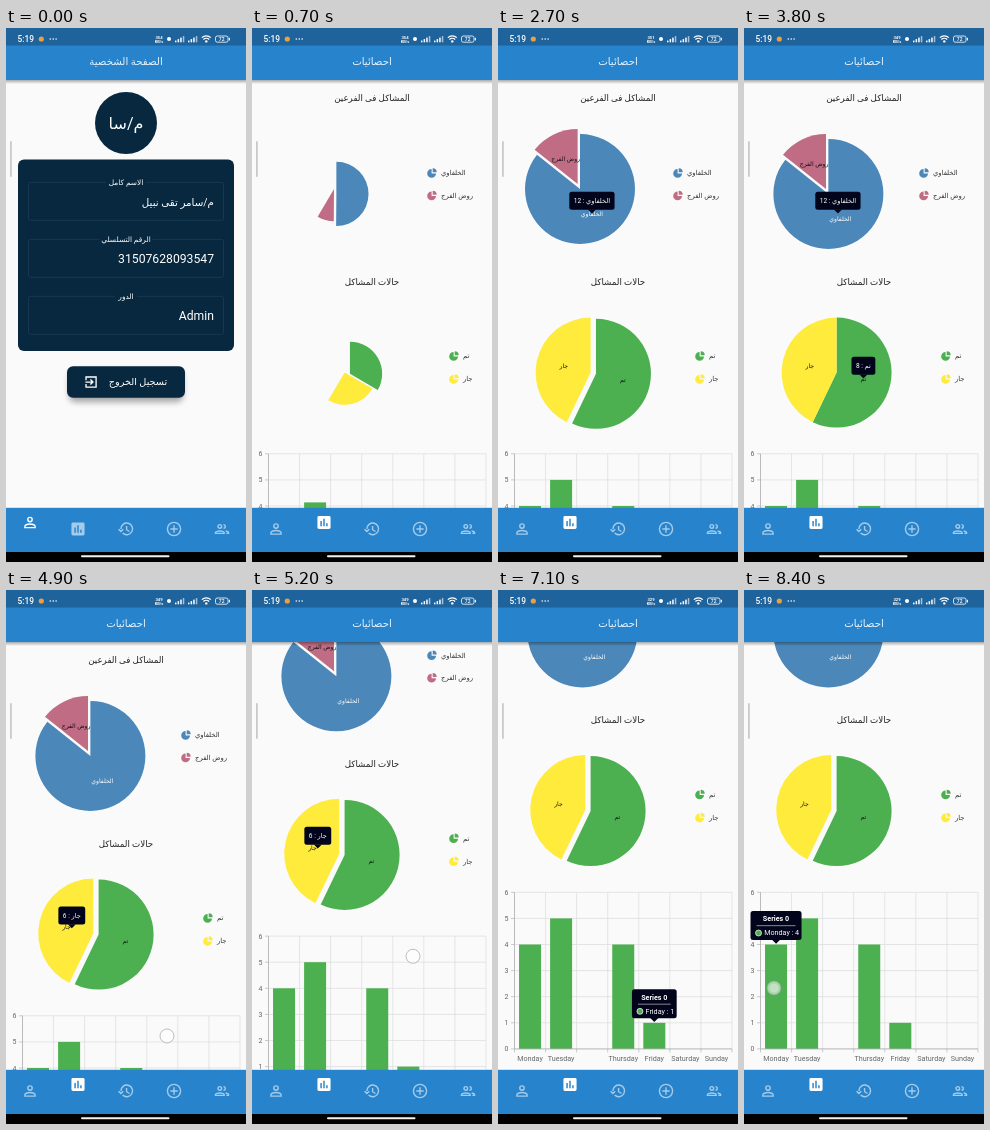
Recreate the animation shown at these times as an HTML page. Size 240 by 534 pixels, loop 8500 ms.

```html
<!DOCTYPE html>
<html lang="ar">
<head>
<meta charset="utf-8">
<style>
html, body { margin: 0; width: 100%; height: 100%; overflow: hidden; background: #fafafa; }
svg { display: block; width: 100vw; height: 100vh; }
text { font-family: Roboto, "DejaVu Sans", sans-serif; }
</style>
</head>
<body>
<svg id="stage" viewBox="0 0 240 534">
  <defs>
    <linearGradient id="shade" x1="0" y1="0" x2="0" y2="1">
      <stop offset="0" stop-color="#000" stop-opacity=".32"/>
      <stop offset="1" stop-color="#000" stop-opacity="0"/>
    </linearGradient>
    <filter id="blur" x="-20%" y="-60%" width="140%" height="220%"><feGaussianBlur stdDeviation="3"/></filter>
    <clipPath id="navClip"><rect y="480" width="240" height="44"/></clipPath>
  </defs>
</svg>
<script>
const LOOP = 8500, SCROLL = 123.5;
const BLUE = '#2784cc', NAVY = '#08283f', GREEN = '#4caf50', INK = '#222';
const svg = document.getElementById('stage');

function el(parent, tag, attrs = {}, content) {
  const node = document.createElementNS('http://www.w3.org/2000/svg', tag);
  set(node, attrs);
  if (content !== undefined) node.textContent = content;
  parent.appendChild(node);
  return node;
}
function set(node, attrs) {
  for (const k in attrs) node.setAttribute(k, attrs[k]);
}
const rect = (p, x, y, width, height, fill, more) => el(p, 'rect', { x, y, width, height, fill, ...more });
const circle = (p, cx, cy, r, fill, more) => el(p, 'circle', { cx, cy, r, fill, ...more });
const path = (p, d, more) => el(p, 'path', { d, ...more });
const text = (p, str, x, y, size, fill = '#fff', anchor = 'middle', more) =>
  el(p, 'text', { x, y, 'font-size': size, fill, 'text-anchor': anchor, ...more }, str);
const show = (node, on) => node.setAttribute('display', on ? 'inline' : 'none');
const clamp = v => Math.max(0, Math.min(1, v));
const ramp = (t, a, b) => clamp((t - a) / (b - a));
const easeOut = v => 1 - (1 - v) ** 2;
const rad = deg => deg * Math.PI / 180;

function wedge(cx, cy, r, a, b) {
  const pt = deg => `${cx + r * Math.cos(rad(deg))} ${cy + r * Math.sin(rad(deg))}`;
  return `M${cx} ${cy}L${pt(a)}A${r} ${r} 0 ${b - a > 180 ? 1 : 0} 1 ${pt(b)}Z`;
}

// Profile page
const profile = el(svg, 'g');
circle(profile, 120, 95, 31, NAVY);
text(profile, 'م/سا', 120, 101, 16);
rect(profile, 12, 131.5, 216, 191.5, NAVY, { rx: 6 });
[
  ['الاسم كامل', 'م/سامر تقى نبيل', 10.3, 40],
  ['الرقم التسلسلي', '31507628093547', 12.2, 53],
  ['الدور', 'Admin', 12.2, 22]
].forEach(([label, value, size, gap], i) => {
  const y = 154.3 + i * 57;
  rect(profile, 22.5, y, 195, 38, 'none', { rx: 2, stroke: '#1d4058', 'stroke-width': .7 });
  rect(profile, 120 - gap / 2, y - 1, gap, 2, NAVY);
  text(profile, label, 120, y + 2.6, 7.4);
  text(profile, value, 208, y + 23.6, size, '#fff', 'end');
});
rect(profile, 63, 343, 114, 31, '#000', { rx: 6, opacity: .35, filter: 'url(#blur)' });
rect(profile, 61, 338.3, 118, 31.5, NAVY, { rx: 6 });
text(profile, 'تسجيل الخروج', 132, 357, 9.7);
path(profile, 'M4 9V4h16v16H4v-5M3 12h12M11 8l4 4-4 4', {
  transform: 'translate(77.5 346.5) scale(.63)', fill: 'none', stroke: '#fff', 'stroke-width': 2.1
});

// Statistics page
const stats = el(svg, 'g');
text(stats, 'المشاكل فى الفرعين', 120, 73, 8.7, INK);
text(stats, 'حالات المشاكل', 120, 256.5, 8.7, INK);

function legend(x, y, color, label) {
  path(stats, wedge(x - .4, y + .4, 4.4, 0, 270) + wedge(x + .7, y - .7, 4, 270, 360), { fill: color });
  text(stats, label, x + 9, y + 2.4, 6.8, '#333', 'start');
}

function makePie(cx, cy, parts) {
  const total = parts.reduce((s, p) => s + p.value, 0), r = 55;
  let from = 0;
  const slices = parts.map(p => {
    const s = { from, span: 360 * p.value / total };
    from += s.span;
    const mid = rad(s.from + s.span / 2 - 90);
    s.dx = Math.cos(mid);
    s.dy = Math.sin(mid);
    s.tip = [cx + s.dx * r / 2, cy + s.dy * r / 2];
    s.shape = path(stats, '', { fill: p.color });
    s.text = p;
    return s;
  });
  slices.forEach(s => s.label = text(stats, s.text.label, 0, 0, 6.1, s.text.ink));
  return {
    slices,
    draw(grow, out, fade) {
      slices.forEach((s, i) => {
        const off = i === out ? r * .1 : 0;
        const x = cx + s.dx * off, y = cy + s.dy * off;
        const a = -90 + s.from * grow;
        s.shape.setAttribute('d', grow > 0 ? wedge(x, y, r * grow, a, a + s.span * grow) : '');
        set(s.label, { x: x + s.dx * r / 2, y: y + s.dy * r / 2 + 2, opacity: fade });
      });
    }
  };
}

const branches = makePie(82, 161, [
  { label: 'الخلفاوي', value: 12, color: '#4b87b9', ink: '#fff' },
  { label: 'روض الفرج', value: 2, color: '#c06c84', ink: '#111' }
]);
const states = makePie(92.6, 344.6, [
  { label: 'تم', value: 8, color: GREEN, ink: '#111' },
  { label: 'جار', value: 6, color: '#ffeb3b', ink: '#111' }
]);
legend(180, 145, '#4b87b9', 'الخلفاوي');
legend(180, 167.5, '#c06c84', 'روض الفرج');
legend(202, 328, GREEN, 'تم');
legend(202, 351, '#ffeb3b', 'جار');

// Column chart
const DAYS = ['Monday', 'Tuesday', '', 'Thursday', 'Friday', 'Saturday', 'Sunday'];
const COUNTS = [4, 5, 0, 4, 1, 0, 0];
const LEFT = 16.5, STEP = 31.07, BASE = 582.4, UNIT = 26.1;
const dayX = i => LEFT + STEP * (i + .5);
const line = (x1, y1, x2, y2, stroke) => el(stats, 'line', { x1, y1, x2, y2, stroke, 'stroke-width': .7 });
for (let v = 0; v <= 6; v++) {
  const y = BASE - v * UNIT;
  line(LEFT, y, 234, y, '#dcdcdc');
  line(13, y, LEFT, y, '#b5b5b5');
  text(stats, v, 10.5, y + 2.5, 7, '#666', 'end');
}
for (let i = 0; i <= 7; i++) {
  const x = LEFT + STEP * i;
  line(x, BASE - 6 * UNIT, x, BASE, '#dcdcdc');
  line(x, BASE, x, BASE + 3.5, '#b5b5b5');
}
const bars = COUNTS.map((v, i) => rect(stats, dayX(i) - 11, BASE, 22, 0, GREEN));
line(LEFT, BASE - 6 * UNIT, LEFT, BASE, '#aaa');
line(LEFT, BASE, 234, BASE, '#aaa');
DAYS.forEach((d, i) => text(stats, d, dayX(i), BASE + 11.6, 7.2, '#666'));

// Tooltips
const tips = [];
function makeTip(x, y, height, from, to, fill) {
  const g = el(stats, 'g');
  const box = rect(g, 0, y - height - 4, 0, height, '#01041a', { rx: 2.5 });
  path(g, `M${x - 4} ${y - 4.2}h8l-4 4z`, { fill: '#01041a' });
  const width = fill(g, y - height - 4);
  set(box, { x: x - width / 2, width });
  tips.push({ g, x, y, from, to });
}
function pieTip(pie, i, from, to) {
  const s = pie.slices[i], [x, y] = s.tip;
  makeTip(x, y, 18, from, to, (g, top) => {
    const t = text(g, `${s.text.label} : ${s.text.value}`, x, top + 11.3, 6.6);
    return t.getComputedTextLength() + 9;
  });
}
function barTip(i, from, to) {
  const x = dayX(i);
  makeTip(x, BASE - COUNTS[i] * UNIT - .5, 29, from, to, (g, top) => {
    const t = text(g, `${DAYS[i]} : ${COUNTS[i]}`, x + 5.6, top + 24.4, 7.2);
    const width = t.getComputedTextLength() + 16;
    text(g, 'Series 0', x, top + 10.2, 7.2, '#fff', 'middle', { 'font-weight': 700 });
    rect(g, x - width / 2 + 6, top + 14.5, width - 12, .6, '#ddd');
    circle(g, x - width / 2 + 8, top + 22, 3, GREEN, { stroke: '#fff', 'stroke-width': .7 });
    return width;
  });
}
pieTip(branches, 1, 1880, 2560);
pieTip(branches, 0, 2570, 4200);
pieTip(states, 0, 3540, 4560);
pieTip(states, 1, 4600, 6450);
barTip(3, 5960, 6760);
barTip(4, 6780, 7500);
barTip(1, 7520, 8240);
barTip(0, 8250, LOOP);

// App bar and status bar
rect(svg, 0, 52, 240, 4, 'url(#shade)');
rect(svg, 0, 0, 240, 52, BLUE);
rect(svg, 0, 0, 240, 17.5, '#1f639c');
const title = text(svg, '', 120, 37.3, 10.2, '#e9f3fb');
text(svg, '5:19', 11.5, 14, 8.4, '#fff', 'start', { 'font-weight': 500 });
circle(svg, 35.3, 11, 2.6, '#e9a23b');
[44.3, 47.2, 50.1].forEach(x => circle(svg, x, 11, .8, '#fff'));
const speed = text(svg, '', 153, 10.6, 4.2, '#fff', 'middle', { 'font-weight': 700 });
text(svg, 'KB/s', 153, 14.9, 4, '#fff', 'middle', { 'font-weight': 700 });
circle(svg, 163, 11, 2, '#fff');
[169, 182].forEach(x => {
  for (let i = 0; i < 4; i++) rect(svg, x + i * 2.6, 12.6 - i * 1.5, 1.5, 1.7 + i * 1.5, '#fff', { opacity: i < 3 ? 1 : .6 });
});
path(svg, 'M195.8 9.6a6.5 6.5 0 0 1 9 0M197.4 11.5a4.2 4.2 0 0 1 5.8 0', { fill: 'none', stroke: '#fff', 'stroke-width': 1.2 });
circle(svg, 200.3, 13.4, 1.2, '#fff');
rect(svg, 209.5, 8, 12.5, 6.2, 'none', { rx: 1.8, stroke: '#fff', 'stroke-width': .8 });
rect(svg, 222.8, 9.8, 1.1, 2.6, '#fff');
text(svg, '72', 215.7, 12.9, 5, '#fff', 'middle', { 'font-weight': 500 });
rect(svg, 4, 113, 1.8, 36, '#c9c9c9', { rx: .9 });

// Bottom navigation
rect(svg, 0, 479.8, 240, 44.5, BLUE);
const ripple = circle(svg, 72, 501, 0, '#fff', { 'clip-path': 'url(#navClip)' });
const ICONS = [
  'M12 5a3 3 0 1 1 0 6a3 3 0 1 1 0-6M5 19v-2c0-2 5-3 7-3s7 1 7 3v2z',
  'M19 3H5a2 2 0 0 0-2 2v14a2 2 0 0 0 2 2h14a2 2 0 0 0 2-2V5a2 2 0 0 0-2-2zM9 17H7v-7h2zM13 17h-2V7h2zM17 17h-2v-4h2z',
  'M5 12a8 8 0 1 1 2.4 5.6M1.8 12.2l3.2 3.2 3.2-3.2M12.8 8v5l4 2.4',
  'M12 3a9 9 0 1 1 0 18a9 9 0 1 1 0-18M12 7v10M7 12h10',
  'M9 6a2.5 2.5 0 1 1 0 5a2.5 2.5 0 1 1 0-5M3 18v-1c0-1.5 4-2.3 6-2.3s6 .8 6 2.3v1zM14 6a2.5 2.5 0 1 1 0 5M17 14.7c2 .4 4 1.2 4 2.3v1h-3'
];
const icons = ICONS.map((d, i) => path(svg, d, i === 1
  ? { 'fill-rule': 'evenodd' }
  : { fill: 'none', 'stroke-width': 1.9 }));
rect(svg, 0, 524, 240, 10, '#000');
rect(svg, 75, 527.3, 88.5, 2, '#f2f2f2', { rx: 1 });

// Finger marks: x, y, start, end
const TAPS = [
  [72, 499, 110, 260], [67, 128, 1730, 1860], [100, 196, 2430, 2560],
  [118, 342, 3400, 3530], [62, 352, 4450, 4580], [161, 446, 4850, 5300],
  [125, 398, 5840, 5970], [156, 446, 6650, 6780], [63, 398, 7390, 7520], [30, 398, 8220, LOOP]
];
const touch = el(svg, 'g');
circle(touch, 0, 0, 7, '#fff', { 'fill-opacity': .5, stroke: '#999', 'stroke-opacity': .7, 'stroke-width': .9 });
circle(touch, 0, 0, 4.6, '#fff', { 'fill-opacity': .3 });

function draw(t) {
  const open = t >= 290;
  show(profile, !open);
  show(stats, open);
  title.textContent = open ? 'احصائيات' : 'الصفحة الشخصية';
  speed.textContent = t < 1000 ? '354' : t < 3600 ? '351' : t < 6700 ? '349' : '329';

  const grow = ramp(t, 394, 919), fade = ramp(t, 930, 1050);
  branches.draw(grow, t >= 1940 && t < 2750 ? 1 : 0, fade);
  states.draw(grow, t < 3620 ? 0 : t < 4680 ? -1 : 1, fade);
  bars.forEach((b, i) => {
    const h = COUNTS[i] * UNIT * easeOut(grow);
    set(b, { y: BASE - h, height: h });
  });

  const scroll = SCROLL * easeOut(ramp(t, 4930, 5600));
  stats.setAttribute('transform', `translate(0 ${-scroll})`);

  for (const { g, x, y, from, to } of tips) {
    const on = t >= from && t < to;
    show(g, on);
    const k = easeOut(ramp(t, from, from + 110));
    if (on) g.setAttribute('transform', `translate(${x} ${y}) scale(${k}) translate(${-x} ${-y})`);
  }

  const pick = ramp(t, 270, 430);
  icons.forEach((icon, i) => {
    const up = i === 0 ? 1 - pick : i === 1 ? pick : 0;
    const k = .73;
    set(icon, {
      transform: `translate(${24 + 48 * i - 12 * k} ${501 - 6.5 * up - 12 * k}) scale(${k})`,
      [i === 1 ? 'fill' : 'stroke']: '#fff',
      opacity: .58 + .42 * up
    });
  });
  const wave = ramp(t, 140, 560);
  set(ripple, { r: 42 * easeOut(wave), opacity: wave > 0 ? .14 * (1 - wave) : 0 });

  const tap = TAPS.find(([, , a, b]) => t >= a && t < b);
  show(touch, !!tap);
  if (tap) touch.setAttribute('transform', `translate(${tap[0]} ${tap[1] - scroll * (tap[0] === 161)})`);
}

const start = performance.now();
function frame(now) {
  draw(Math.max(0, now - start) % LOOP);
  requestAnimationFrame(frame);
}
draw(0);
requestAnimationFrame(frame);
</script>
</body>
</html>
```
